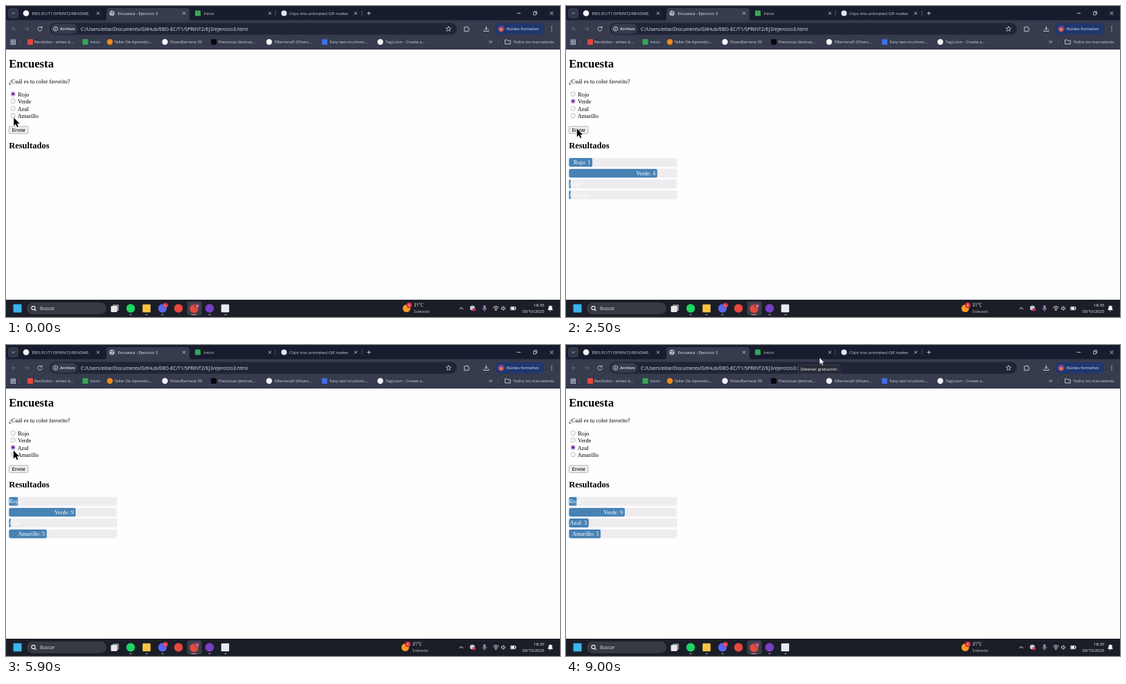
These frames come from a looping animation (800 px wide and 450 px high, 9100 ms). An HTML page:

```html
<!DOCTYPE html>
<html lang="es">
<head>
<meta charset="utf-8">
<title>Encuesta</title>
<style>
html, body { margin: 0; width: 100%; height: 100%; overflow: hidden; background: #fefefe; }
#page {
  position: absolute; left: 0; top: 63px; width: 1520px; padding: 0 8px; height: 690px; overflow: hidden;
  transform: scale(.520833); transform-origin: 0 0;
  font: 16px "Liberation Serif", "Times New Roman", serif; color: #000;
}
h1 { font-size: 32px; line-height: 37px; margin: 21.4px 0; }
p { line-height: 18px; margin: 0 0 16px; }
label { display: block; height: 20px; line-height: 18px; white-space: nowrap; }
input { margin: 3px 3px 0 5px; accent-color: #6a1b9a; }
button {
  display: block; margin: 19.2px 0 19.9px; padding: 0; width: 54px; height: 21px;
  font: 13.33px "Liberation Sans", Arial, sans-serif; color: #000;
  background: #efefef; border: 1px solid #767676; border-radius: 3px;
}
h2 { font-size: 24px; line-height: 27px; margin: 0 0 20px; }
.track { width: 300px; height: 25px; margin-bottom: 5px; background: #eeecef; border-radius: 5px; overflow: hidden; }
.bar {
  height: 25px; padding-right: 5px; border-radius: 5px; background: #4682b4;
  color: #fff; line-height: 25px; text-align: right;
}
svg { position: absolute; left: 0; top: 0; font-family: "Open Sans", "Noto Sans", sans-serif; }
</style>
</head>
<body>
<div id="page">
  <h1>Encuesta</h1>
  <p>¿Cuál es tu color favorito?</p>
  <div id="options"></div>
  <button>Enviar</button>
  <h2>Resultados</h2>
  <div id="results"></div>
</div>
<svg id="ui" width="800" height="450" viewBox="0 0 800 450"></svg>
<script>
const $ = id => document.getElementById(id);
const LOOP = 9100, colors = ['Rojo', 'Verde', 'Azul', 'Amarillo'];

// Drawing helpers: text and icons are placed by their vertical centre.
const text = (x, y, size, str, fill = '#d0d3de', extra = '') =>
  `<text x="${x}" y="${y + size * .36}" font-size="${size}" fill="${fill}" ${extra}>${str}</text>`;
const rect = (x, y, w, h, fill, r = 0, extra = '') =>
  `<rect x="${x}" y="${y}" width="${w}" height="${h}" rx="${r}" fill="${fill}" ${extra}/>`;
const dot = (x, y, r, fill) => `<circle cx="${x}" cy="${y}" r="${r}" fill="${fill}"/>`;
const square = (x, y, size, fill) => rect(x - size / 2, y - size / 2, size, size, fill, 1);
const line = (x, y, d, stroke = '#d0d3de', w = .9) =>
  `<path transform="translate(${x} ${y})" d="${d}" fill="none" stroke="${stroke}" stroke-width="${w}"/>`;
const cross = (x, y, s = 2) => line(x, y, `M${-s} ${-s}L${s} ${s}M${s} ${-s}L${-s} ${s}`);
const ring = r => `M${-r} 0a${r} ${r} 0 1 0 ${2 * r} 0a${r} ${r} 0 1 0 ${-2 * r} 0`;

function tabs() {
  return rect(0, 0, 800, 21, '#171d2e') + rect(0, 20.5, 800, 42.5, '#363b4e') +
    rect(3, 3, 15, 15, '#323749', 4) + line(10.5, 10.5, 'M-2 -1L0 1L2 -1') +
    '<path d="M141 21Q145 21 145 17V7Q145 3 149 3H261Q265 3 265 7V17Q265 21 269 21Z" fill="#363b4e"/>' +
    dot(29, 10.5, 4.3, '#f4f4f6') + text(37.5, 10.5, 6, 'EBO-EC/T1/SPRINT2/README.') +
    dot(153, 10.5, 3.8, '#b9bdc9') + line(153, 10.5, 'M-3 -1H0L1 1L-1 3M1 -3V-1H3', '#4c5265') +
    text(161.5, 10.5, 5.95, 'Encuesta - Ejercicio 3', '#eceef5') +
    square(277, 10.5, 8, '#35a853') + text(285.5, 10.5, 6, 'Inicio') +
    dot(401.5, 10.5, 4, '#dfe5f2') + text(409, 10.5, 6.1, 'Clips into animated GIF maker') +
    [133, 257, 381, 505].map(x => cross(x, 10.5)).join('') +
    line(389, 10.5, 'M0 -4V4', '#51576a') + line(514, 10.5, 'M0 -4V4', '#51576a') +
    line(524, 10.5, 'M-2.7 0H2.7M0 -2.7V2.7') +
    line(740.5, 10.5, 'M-2.6 0H2.6') +
    line(764, 10.5, 'M-2.5 -1.3H1.3V2.5H-2.5ZM-1 -1.3V-2.7H2.7V1H1.3', '#d0d3de', .8) +
    cross(788, 10.5, 2.5);
}

function toolbar() {
  const arrow = 'M3.2 0H-3M0 -3L-3 0L0 3';
  return line(11.5, 33, arrow, '#6c7184') + line(30, 33, 'M-3.2 0H3M0 -3L3 0L0 3', '#6c7184') +
    line(49, 33, 'M2.6 -1.5A3 3 0 1 0 3 .8M3 -3.5V-1.2H.7') +
    rect(63, 24.5, 588, 17, '#1f2537', 8.5) + rect(65, 26, 38, 14, '#363b4e', 7) +
    line(71.5, 33, ring(3) + 'M0 -.4V1.7M0 -1.7V-1', '#eceef5', .8) +
    text(78, 33, 5.9, 'Archivo', '#eceef5', 'font-weight="600"') +
    text(108, 33, 7, 'C:/Users/elise/Documents/GitHub/EBO-EC/T1/SPRINT2/EJ3/ejercicio3.html', '#e6e8f0') +
    line(639, 33, 'M0 -3.7L1.1 -1.2L3.7 -1L1.7 .7L2.3 3.3L0 1.9L-2.3 3.3L-1.7 .7L-3.7 -1L-1.1 -1.2Z', '#d0d3de', .8) +
    line(665, 33, 'M-3.3 -2.3H-1A1.1 1.1 0 0 1 1.2 -2.3H2.8V-.3A1.1 1.1 0 0 1 2.8 2V3.7H-3.3V1.7A1 1 0 0 0 -3.3 -.3Z') +
    line(693.5, 33, 'M0 -4V1M-2.3 -1L0 1.3L2.3 -1M-3.5 1.5V3.5H3.5V1.5') +
    rect(706, 25, 71, 16, '#20376f', 8) + dot(715, 33, 5, '#6a3e86') + dot(715, 34, 2.8, '#e47845') +
    text(723, 33, 5.75, 'Núcleo formativo', '#e8edfb', 'font-weight="500"') +
    [-3, 0, 3].map(d => dot(788, 33 + d, .8, '#d0d3de')).join('');
}

function bookmarks() {
  const items = [
    [35, 41, '#e5483b', 'Recibidos - eliseo.b...', 1], [114.5, 121.5, '#35a853', 'Inicio', 1],
    [150, 156.5, '#f28a1d', 'Taller De Aprendiz...'], [229.5, 237, '#f4f4f6', 'EliseoBarrena-30'],
    [300, 307, '#08090c', 'Preciosas láminas...', 1], [380, 388, '#f4f4f6', 'EBarrenaO (Eliseo...'],
    [460, 467.5, '#3f6fe8', 'Easy text-to-photo...', 1], [540.5, 548, '#f4f4f6', 'TagLoom - Create a...']
  ];
  const apps = [0, 1, 2, 3].map(i =>
    rect(7 + i % 2 * 4, 49 + (i >> 1) * 4, 2.6, 2.6, 'none', 0, 'stroke="#d0d3de" stroke-width=".8"')).join('');
  return apps + line(20, 52, 'M0 -4V4', '#51576a') +
    items.map(([ix, x, fill, str, sq]) =>
      (sq ? square(ix, 52, 8, fill) : dot(ix, 52, 4.2, fill)) + text(x, 52, 5.85, str)).join('') +
    line(699.5, 52, 'M-2 -1.8L0 0L-2 1.8M.5 -1.8L2.5 0L.5 1.8', '#d0d3de', .8) +
    line(711, 52, 'M0 -4V4', '#51576a') +
    line(724.5, 52, 'M-3.8 -3H-1L0 -2H3.8V3H-3.8Z') + text(732.5, 52, 5.8, 'Todos los marcadores');
}

function taskbar() {
  const y = 437.5, white = '#f0f1f4';
  return rect(0, 425, 800, 25, '#1b1e27') +
    square(16.5, y, 12, '#39b4ee') + rect(30, 429, 115, 17, '#373a43', 8.5) +
    line(39.5, 437, ring(2.6) + 'M1.8 1.9L4 4.2', white, 1.1) + text(49, y, 6.8, 'Buscar', '#e2e3e7') +
    rect(154, 432, 9, 9, '#85898f', 1) + rect(151.5, 434, 9, 9, '#e5e7ea', 1) +
    dot(180, y, 6.2, '#1ed760') +
    square(203, y, 11.5, '#f6c544') +
    dot(226, y, 6.2, '#5865f2') + dot(230.3, 433, 3.6, '#d93040') +
    text(230.3, 433, 4.2, '9+', '#fff', 'text-anchor="middle"') +
    dot(249, y, 6.2, '#e5483b') +
    rect(261.5, 427.5, 21, 20, '#3a3e49', 3) + dot(271.5, 438, 6.2, '#e5483b') +
    dot(276, 433.5, 3.7, '#6a3e86') + dot(276, 434.2, 2, '#e47845') +
    dot(294, y, 6.2, '#7b3fc6') + square(316.5, y, 11.5, '#e8ecf1') +
    [180, 203, 226, 294, 317].map(x => rect(x - 1.7, 446, 3.4, 1.3, '#9a9da6', .6)).join('') +
    rect(267.5, 446, 8, 1.3, '#e57fa3', .6) +
    '<g id="weather">' + dot(576.5, y, 5.5, '#f59b22') + dot(580.2, 433, 4, '#d93040') +
    text(580.2, 433, 4.8, '4', '#fff', 'text-anchor="middle"') +
    text(586.8, 433, 6.2, '31°C', white) + text(586.8, 441.5, 6.1, 'Soleado', '#c3c5cb') + '</g>' +
    line(657.5, y, 'M-2.7 1.4L0 -1.4L2.7 1.4', white, 1) +
    dot(673.5, 437, 3.6, '#c9ccd3') + dot(676, 439.3, 2.3, '#d93040') +
    rect(689.5, 433, 3, 5.5, '#a991c4', 1.5) + line(691, y, 'M-2.8 -.5A2.8 2.8 0 0 0 2.8 -.5M0 2.4V4.3', '#a991c4') +
    line(707.5, y, 'M-4 -1.2A5.7 5.7 0 0 1 4 -1.2M-2.6 .6A3.7 3.7 0 0 1 2.6 .6M-1.1 2.1A1.6 1.6 0 0 1 1.1 2.1', white, 1) +
    dot(707.5, 440.3, .8, white) +
    line(718.5, y, 'M-3 -1.2H-1.5L.4 -3V3L-1.5 1.2H-3ZM1.8 -1.4A2 2 0 0 1 1.8 1.4', white, .8) +
    line(732.5, y, 'M-3.7 -2.2H3V2.2H-3.7ZM3.9 -.8V.8', white, .9) + rect(729.5, 435.8, 4.5, 3.4, white) +
    text(777.5, 433, 6.05, '18:35', white, 'text-anchor="end"') +
    text(777.5, 441.5, 6.05, '03/10/2025', white, 'text-anchor="end"') +
    `<path d="M782.3 440Q783.5 438.5 783.5 436A2.5 2.5 0 0 1 788.5 436Q788.5 438.5 789.7 440ZM784.8 440.8H787.2L786 442Z" fill="${white}"/>` +
    text(787.6, 434.5, 4, 'z', white);
}

$('ui').innerHTML = tabs() + toolbar() + bookmarks() + taskbar() +
  '<g id="tip">' + rect(335, 28.5, 61, 13.5, '#292c35', 2, 'stroke="#454954" stroke-width=".5"') +
  text(339, 35.2, 6.1, 'Detener grabación', '#fff') + '</g>' +
  '<path id="cursor" d="M0 0V13L3 10.3L5 14.6L7.3 13.5L5.4 9.5H9.2Z" stroke-width=".6"/>';

$('options').innerHTML = colors.map(c => `<label><input type="radio" name="color" tabindex="-1"> ${c}</label>`).join('');
$('results').innerHTML = colors.map(() => '<div class="track"><div class="bar"></div></div>').join('');
const radios = document.querySelectorAll('input'), bars = document.querySelectorAll('.bar');

// Vote runs: colour, first click, interval, number of clicks.
const runs = [[0, 400, 0, 1], [1, 1750, 205, 9], [3, 4350, 180, 5], [2, 6250, 200, 3]];
const choices = [[0, 0], [1200, 1], [3950, 3], [5800, 2]];
const path = [
  [0, 11, 161], [350, 16, 177], [600, 16, 177], [1150, 10.5, 136], [1300, 10.5, 136],
  [1500, 13.5, 165], [1600, 15.5, 177], [3450, 15.5, 177], [3600, 15.5, 168.5],
  [3850, 10.5, 157], [4000, 10.5, 157], [4250, 15.5, 178.5], [5300, 15.5, 178.5],
  [5650, 10.5, 147], [5800, 10.5, 147], [5900, 10.5, 152], [6150, 15.5, 178.5],
  [6800, 15.5, 178.5], [7500, 359, 27.5], [7900, 359, 27.5], [8200, 366, 18], [LOOP, 366, 18]
];

function cursorAt(t) {
  const i = path.findIndex(k => k[0] > t), [t0, x0, y0] = path[i - 1], [t1, x1, y1] = path[i];
  const p = (t - t0) / (t1 - t0);
  return [x0 + (x1 - x0) * p, y0 + (y1 - y0) * p];
}

function draw(now) {
  const t = Math.floor(now % LOOP / 100) * 100;
  const votes = [0, 0, 0, 0];
  for (const [c, start, gap, n] of runs)
    for (let i = 0; i < n; i++) if (t >= start + i * gap) votes[c]++;
  const total = votes.reduce((a, b) => a + b);
  $('results').style.display = total ? '' : 'none';
  bars.forEach((bar, i) => {
    bar.style.width = (total ? votes[i] / total * 100 : 0) + '%';
    bar.textContent = `${colors[i]}: ${votes[i]}`;
  });
  radios[choices.filter(c => c[0] <= t).pop()[1]].checked = true;

  const [x, y] = cursorAt(t), dark = y < 63, cursor = $('cursor');
  cursor.setAttribute('transform', `translate(${x} ${y}) scale(${dark ? .78 : 1})`);
  cursor.setAttribute('fill', dark ? '#fff' : '#000');
  cursor.setAttribute('stroke', dark ? '#000' : '#fff');
  $('tip').style.display = t >= 8400 ? '' : 'none';
  $('weather').setAttribute('transform', `translate(${t < 700 ? 2 : 0} 0)`);
}

const begin = performance.now();
(function tick() {
  draw(performance.now() - begin);
  requestAnimationFrame(tick);
})();
</script>
</body>
</html>
```
